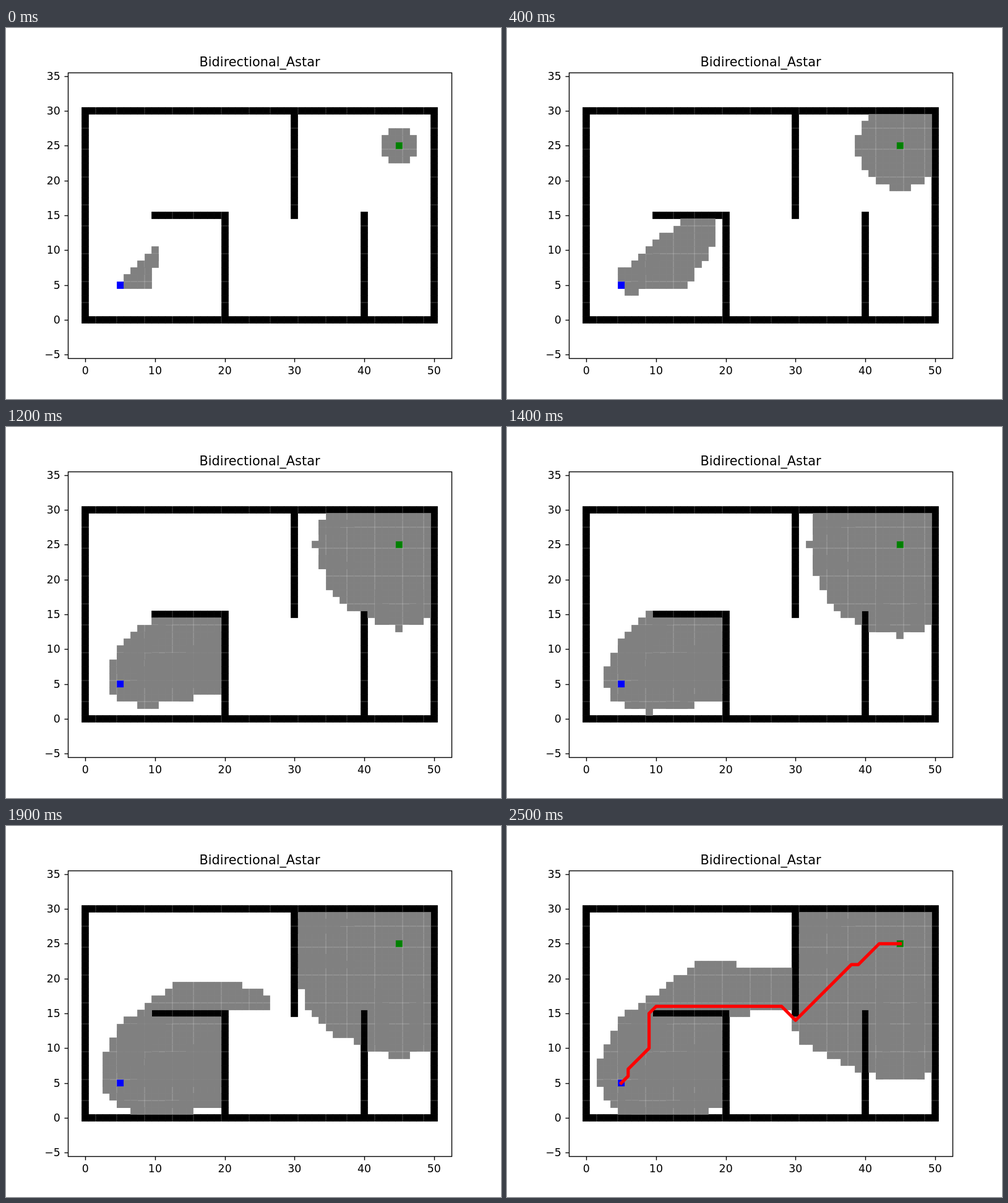
Animation of 800x600 px, one loop 2600 ms. Source, as an HTML page with a canvas:

```html
<!DOCTYPE html>
<html lang="en">
<head>
<meta charset="utf-8">
<title>Bidirectional_Astar</title>
<style>
html, body { margin: 0; width: 100%; height: 100%; overflow: hidden; background: #fff; }
canvas { display: block; }
</style>
</head>
<body>
<canvas id="stage" width="800" height="600"></canvas>
<script>
const ctx = document.getElementById('stage').getContext('2d');
const PT = 125 / 72;                 // pixels per point
const UNIT = 620 / 55;               // pixels per grid cell
const px = x => 100 + (x + 2.5) * UNIT;
const py = y => 303 + (15 - y) * UNIT;

const START = [5, 5], GOAL = [45, 25];
const PATH = [[5, 5], [6, 6], [6, 7], [9, 10], [9, 15], [10, 16], [28, 16],
              [30, 14], [38, 22], [39, 22], [42, 25], [45, 25]];
const PER_STEP = 20, STEPS = 26, STEP_MS = 100;

const key = (x, y) => x * 100 + y;

// Walls, keyed by cell
const walls = new Map();
function wall(x0, y0, x1, y1) {
  for (let x = x0; x <= x1; x++)
    for (let y = y0; y <= y1; y++) walls.set(key(x, y), [x, y]);
}
wall(0, 0, 50, 0);
wall(0, 30, 50, 30);
wall(0, 0, 0, 30);
wall(50, 0, 50, 30);
wall(10, 15, 20, 15);
wall(20, 0, 20, 14);
wall(30, 15, 30, 29);
wall(40, 0, 40, 15);

// Both searches measure the heuristic to the goal.
const toGoal = (x, y) => Math.sqrt((x - GOAL[0]) ** 2 + (y - GOAL[1]) ** 2);

function newSearch([x, y]) {
  return { cost: new Map([[key(x, y), 0]]), open: [{ f: 0, x, y }], visited: [] };
}

function popBest(open) {
  let best = 0;
  open.forEach((n, i) => {
    const b = open[best];
    if (n.f < b.f || (n.f === b.f && key(n.x, n.y) < key(b.x, b.y))) best = i;
  });
  return open.splice(best, 1)[0];
}

// Expands one cell; false once it meets the other search.
function expand(search, other) {
  const { x, y } = popBest(search.open);
  if (other.cost.has(key(x, y))) return false;
  search.visited.push([x, y]);
  const base = search.cost.get(key(x, y));
  for (let dx = -1; dx <= 1; dx++) {
    for (let dy = -1; dy <= 1; dy++) {
      const nx = x + dx, ny = y + dy, k = key(nx, ny);
      if ((!dx && !dy) || walls.has(k)) continue;
      const cost = base + (dx && dy ? Math.SQRT2 : 1);
      if (cost < (search.cost.get(k) ?? Infinity)) {
        search.cost.set(k, cost);
        search.open.push({ f: cost + toGoal(nx, ny), x: nx, y: ny });
      }
    }
  }
  return true;
}

const fore = newSearch(START), back = newSearch(GOAL);
const limit = PER_STEP * (STEPS - 1);
while (back.visited.length <= limit && expand(fore, back) && expand(back, fore));

function cell([x, y], color) {
  const half = 5 + PT / 2;
  ctx.fillStyle = color;
  ctx.fillRect(Math.round(px(x)) - half, Math.round(py(y)) - half, 2 * half, 2 * half);
}

function line(x0, y0, x1, y1) {
  ctx.beginPath();
  ctx.moveTo(x0, y0);
  ctx.lineTo(x1, y1);
  ctx.stroke();
}

function label(text, x, y, points, align) {
  ctx.font = `${points * PT}px "DejaVu Sans", sans-serif`;
  ctx.textAlign = align;
  ctx.fillText(text, x, y);
}

function drawAxes() {
  ctx.strokeStyle = ctx.fillStyle = '#000';
  ctx.lineWidth = 0.8 * PT;
  ctx.lineCap = 'butt';
  ctx.lineJoin = 'miter';
  ctx.strokeRect(100.5, 72.5, 620, 462);
  for (let v = 0; v <= 50; v += 10) {
    const x = Math.round(px(v)) + 0.5;
    line(x, 534.5, x, 540.5);
    label(v, px(v), 560, 10, 'center');
  }
  for (let v = -5; v <= 35; v += 5) {
    const y = Math.round(py(v));
    line(94.5, y + 0.5, 100.5, y + 0.5);
    label(String(v).replace('-', '\u2212'), 87.85, y + 6, 10, 'right');
  }
  label('Bidirectional_Astar', 410, 62, 12, 'center');
}

function drawPath() {
  ctx.strokeStyle = '#f00';
  ctx.lineWidth = 3 * PT;
  ctx.lineCap = 'square';
  ctx.lineJoin = 'round';
  ctx.beginPath();
  for (const [x, y] of PATH) ctx.lineTo(px(x), py(y));
  ctx.stroke();
}

function draw(step) {
  ctx.fillStyle = '#fff';
  ctx.fillRect(0, 0, 800, 600);
  cell(START, '#00f');
  cell(GOAL, '#008000');
  for (const c of walls.values()) cell(c, '#000');
  const shown = Math.min(PER_STEP * (step + 1), limit);
  for (let i = 1; i <= shown; i++) {
    if (fore.visited[i]) cell(fore.visited[i], '#808080');
    if (back.visited[i]) cell(back.visited[i], '#808080');
  }
  if (step === STEPS - 1) drawPath();
  drawAxes();
}

let last = -1;
function tick(now) {
  const step = Math.floor(Math.max(now, 0) / STEP_MS) % STEPS;
  if (step !== last) draw(last = step);
  requestAnimationFrame(tick);
}
draw(0);
requestAnimationFrame(tick);
</script>
</body>
</html>
```
